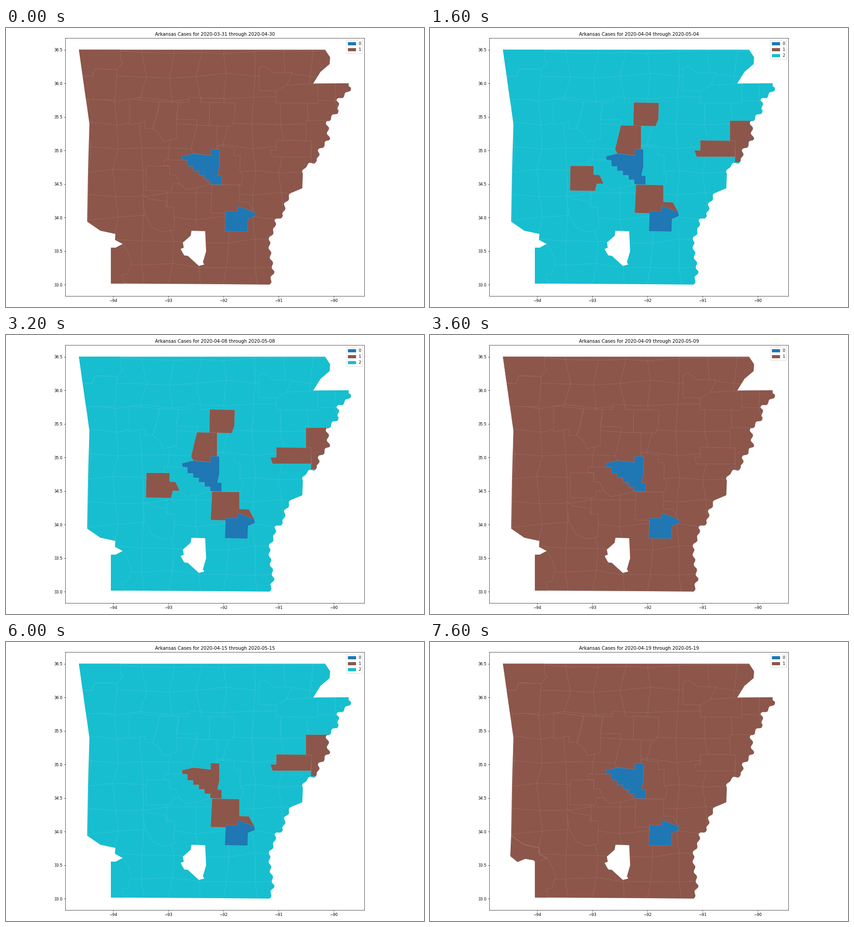
Animation, 917 px wide and 611 px high, one loop 8000 ms. Source, as a matplotlib script:

```python
import numpy as np
import matplotlib.pyplot as plt
from matplotlib.animation import FuncAnimation
from matplotlib.patches import Patch, Polygon

W, H, DPI = 917, 611, 64
SCALE = 0.955  # type and tick sizes relative to the matplotlib defaults
BLUE, BROWN, CYAN, BLACK = "#1f77b4", "#8c564b", "#17becf", "#000000"
PALETTE = [BLUE, BROWN, CYAN, BLACK]
SEAM = (1, 1, 1, 0.14)

plt.rcParams.update({
    "font.family": "DejaVu Sans", "font.size": 10 * SCALE,
    "axes.linewidth": 0.8 * SCALE, "axes.titlepad": 6 * SCALE,
    "xtick.major.size": 3.5 * SCALE, "ytick.major.size": 3.5 * SCALE,
    "xtick.major.width": 0.8 * SCALE, "ytick.major.width": 0.8 * SCALE,
    "xtick.major.pad": 3.5 * SCALE, "ytick.major.pad": 3.5 * SCALE,
})


def pts(*xy):
    return np.reshape(xy, (-1, 2)).astype(float)


def meander(points, swing=3, bend=22):
    """Follow the points with a river-like wave across the path."""
    along = np.r_[0, np.cumsum(np.hypot(*np.diff(points, axis=0).T))]
    t = np.linspace(0, along[-1], int(along[-1] / 2))
    x, y = (np.interp(t, along, c) for c in points.T)
    dx, dy = np.gradient(x), np.gradient(y)
    wave = swing * np.sin(2 * np.pi * t / bend) / np.hypot(dx, dy)
    return np.column_stack([x - wave * dy, y + wave * dx])


def stairs(start, end, steps):
    """Corners of a staircase that rises before each tread."""
    x, y = np.linspace(start, end, steps + 1).T
    return np.column_stack([np.repeat(x, 2)[:-1], np.repeat(y, 2)[1:]])


# State border, clockwise from the north-west corner
NORTH = pts(160, 47.5, 700, 47.5, 711, 64, 710, 79, 690, 96, 674, 121.5, 750, 121)
UPPER_RIVER = pts(752, 121, 757, 130, 749, 142, 726, 159, 731, 180, 704, 205,
                  708, 244, 685, 270, 684, 290, 656, 303, 651, 319)
LOWER_RIVER = pts(626, 361, 612, 386, 608, 411, 590, 422, 590, 437, 577, 465,
                  580, 497, 587, 533, 578, 562)
NOTCH = pts(230, 481, 241, 481, 256, 473, 239, 464, 240, 451, 207, 444, 178, 424)
STATE = np.vstack([NORTH, meander(UPPER_RIVER), pts(650, 351),
                   meander(LOWER_RIVER, swing=2.5), pts(470, 561, 230, 559.5),
                   NOTCH, pts(180, 310, 183, 210)])
LITTLE_RIVER = np.vstack([NOTCH, pts(176, 469, 192, 482, 209, 475, 227, 478)])
CALHOUN = pts(407, 444, 437, 445, 439, 489, 432, 513, 435, 518, 423, 521,
              399, 499, 391, 498, 383, 484, 390, 481, 388, 470, 405, 455)

# Counties that change colour; later ones cover the rough edges of earlier ones
COUNTIES = {
    "Washington": pts(150, 105, 189, 106, 195, 89, 244, 91, 239, 157, 150, 156),
    "Benton": pts(150, 47, 251, 47, 251, 70, 257, 76, 244, 91, 195, 89,
                  189, 106, 150, 105),
    "Johnson": pts(271, 155, 337, 162, 330, 195, 322, 220, 305, 220, 305, 206,
                   271, 212),
    "Pope": pts(337, 162, 379, 163, 374, 200, 374, 242, 345, 249, 337, 232,
                322, 220, 330, 195),
    "Van Buren": pts(379, 163, 401, 163, 401, 152, 427, 152, 427, 163, 448, 164,
                     446, 214, 419, 213, 419, 201, 374, 200),
    "Lonoke": pts(463, 258, 500, 263, 501, 279, 514, 280, 513, 315, 520, 322,
                  516, 344, 473, 344, 464, 323),
    "Saline": pts(347, 289, 398, 289, 448, 343, 428, 348, 396, 354, 381, 341,
                  359, 321, 359, 302, 347, 301),
    "Clark": pts(299, 365, 313, 374, 351, 380, 351, 391, 369, 393, 369, 442,
                 343, 447, 320, 436, 305, 408),
    "Miller": pts(230, 481, 256, 473, 268, 491, 275, 514, 267, 539, 254, 541,
                  259, 562, 230, 562),
    "Craighead": pts(593, 126, 684, 122, 684, 165, 593, 164),
    "Lawrence": pts(555, 88, 566, 83, 587, 98, 628, 98, 615, 126, 593, 138,
                    555, 137),
    "Garland": pts(308, 302, 359, 302, 359, 321, 372, 322, 381, 341, 366, 341,
                   362, 357, 307, 356),
    "Cleburne": pts(447, 163, 502, 164, 501, 200, 495, 215, 446, 214),
    "Faulkner": pts(419, 213, 463, 214, 463, 266, 449, 279, 411, 275, 406, 266),
    "St. Francis": pts(580, 268, 593, 268, 593, 246, 671, 247, 669, 282, 585, 282),
    "Crittenden": pts(658, 203, 720, 203, 720, 294, 669, 294, 670, 247, 658, 247),
    "Jefferson": pts(452, 343, 512, 344, 512, 381, 533, 382, 545, 404, 482, 420,
                     481, 406, 449, 405),
    "Lincoln": pts(482, 401, 508, 401, 510, 390, 545, 404, 546, 412, 531, 418,
                   530, 446, 480, 445),
    "Pulaski": np.vstack([
        pts(386, 281, 411, 275, 449, 279, 449, 265, 468, 266, 468, 303,
            464, 323, 473, 324, 473, 343),
        stairs((448, 342), (398, 303), 4), pts(398, 290, 387, 289)]),
}

# Each map: number of classes, then the class of every county off the last one
TOP_TWO = dict.fromkeys(["Pulaski", "Lincoln"], 0)
EAST = dict.fromkeys(["St. Francis", "Crittenden", "Jefferson"], 1)
HOT_SPOTS = {**TOP_TWO, **EAST, "Garland": 1, "Cleburne": 1}
TWO = (2, TOP_TWO)
THREE = (3, {**HOT_SPOTS, "Faulkner": 1})
FOUR = (4, {**dict.fromkeys(COUNTIES, 2), **HOT_SPOTS})
LATE = (3, {**EAST, "Pulaski": 1, "Lincoln": 0})
DAYS = ([TWO, FOUR] + [THREE] * 3 + [TWO] * 3 + [THREE] + [TWO] * 4
        + [LATE] * 3 + [TWO] * 4)
LITTLE_RIVER_START = 16

fig = plt.figure(figsize=(W / DPI, H / DPI), dpi=DPI, facecolor="white")
left, right, top, bottom = 130.3, 786.4, 21.9, 587
ax = fig.add_axes([left / W, 1 - bottom / H, (right - left) / W, (bottom - top) / H])
ax.set(xlim=(left, right), ylim=(bottom, top))
longitudes, latitudes = np.arange(-94, -89), np.arange(33, 36.6, 0.5)
ax.set_xticks(235 + 121 * (longitudes + 94), [f"\u2212{-v}" for v in longitudes])
ax.set_yticks(47.5 + 147.14 * (36.5 - latitudes), [f"{v:.1f}" for v in latitudes])


def region(points, clip=None, edge="none", color=BROWN):
    patch = ax.add_patch(Polygon(points, facecolor=color, edgecolor=edge, linewidth=0.9))
    if clip:
        patch.set_clip_path(clip)
    return patch


state = region(STATE)
little_river = region(LITTLE_RIVER, edge=SEAM)

# The other county borders: a loose mesh with shifted corners
rng = np.random.default_rng(4)
mesh_x, mesh_y = np.meshgrid(np.arange(117, 800, 61), np.arange(0, 600, 52))
mesh_x = mesh_x + rng.uniform(-9, 9, mesh_x.shape)
mesh_y = mesh_y + rng.uniform(-6, 6, mesh_y.shape)
for line in (ax.plot(mesh_x, mesh_y, color=SEAM, lw=0.9, zorder=1)
             + ax.plot(mesh_x.T, mesh_y.T, color=SEAM, lw=0.9, zorder=1)):
    line.set_clip_path(state)

shapes = {name: region(p, state, SEAM) for name, p in COUNTIES.items()}
region(CALHOUN, color="white")


def update(day):
    classes, marked = DAYS[day]
    base = PALETTE[classes - 1]
    state.set_facecolor(base)
    little_river.set_facecolor(base)
    little_river.set_visible(day >= LITTLE_RIVER_START)
    for name, shape in shapes.items():
        shape.set_facecolor(PALETTE[marked.get(name, classes - 1)])
    start = f"04-{day:02}" if day else "03-31"
    end = f"05-{day:02}" if day else "04-30"
    ax.set_title(f"Arkansas Cases for 2020-{start} through 2020-{end}")
    ax.legend(handles=[Patch(color=PALETTE[i], label=str(i)) for i in range(classes)],
              loc="upper right")
    return []


anim = FuncAnimation(fig, update, frames=len(DAYS), interval=400,
                     init_func=lambda: update(0), repeat=True, repeat_delay=0)
plt.show()
```
